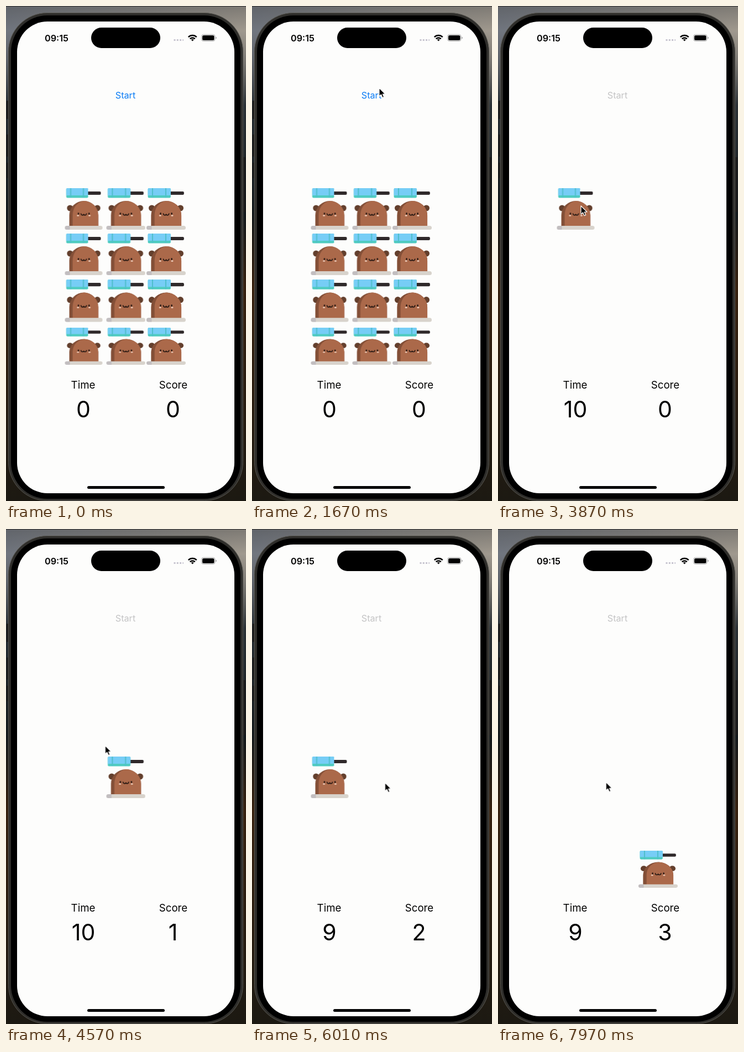
These frames come from a looping animation (434 by 894 pixels, 8000 ms). An HTML page:

```html
<!DOCTYPE html>
<html lang="en">
<head>
<meta charset="utf-8">
<title>Whack a mole</title>
<style>
  html, body { margin: 0; width: 100%; height: 100%; overflow: hidden; background: #15130f; }
  svg { display: block; }
  text { font-family: Inter, Roboto, sans-serif; text-anchor: middle; }
  .label { font-size: 18.7px; }
  .digits { font-size: 41px; }
</style>
</head>
<body>
<svg id="stage" width="434" height="894" viewBox="0 0 434 894">
  <defs>
    <linearGradient id="sky">
      <stop offset="0" stop-color="#70757e"/>
      <stop offset="1" stop-color="#a0998e"/>
    </linearGradient>
    <linearGradient id="dusk" x2="0" y2="1">
      <stop offset="0" stop-color="#4a4b4c" stop-opacity=".4"/>
      <stop offset=".05" stop-color="#4a4b4c" stop-opacity="0"/>
      <stop offset=".2" stop-color="#20272c" stop-opacity=".9"/>
      <stop offset=".42" stop-color="#151a1c"/>
      <stop offset=".57" stop-color="#38220f"/>
      <stop offset="1" stop-color="#1c1912"/>
    </linearGradient>
    <symbol id="mole" viewBox="0 0 68 75" preserveAspectRatio="none">
      <rect x="40" y="6" width="25" height="6" rx="2" fill="#2f292a"/>
      <rect x="2.5" width="39.5" height="17.5" rx="2" fill="#4fcbc0"/>
      <path d="M4.5 0H40a2 2 0 0 1 2 2V13H2.5V2a2 2 0 0 1 2-2Z" fill="#76cdf6"/>
      <path d="M10.5 0V17M33.5 0V17" stroke="#4fbfcb" stroke-width="2"/>
      <circle cx="9.3" cy="36" r="5.5" fill="#633f2d"/>
      <circle cx="58.7" cy="36" r="5.5" fill="#633f2d"/>
      <path d="M8 69V49a26.2 26 0 0 1 52.4 0V69Z" fill="#834f37"/>
      <path d="M14 69V49C14 35 23 24 35.5 23.1A26 26 0 0 1 60.4 49V69Z" fill="#ab694a"/>
      <ellipse cx="23.7" cy="49.5" rx="2" ry="1.5" fill="#e8c3b0"/>
      <ellipse cx="44.5" cy="49.5" rx="2" ry="1.5" fill="#e8c3b0"/>
      <ellipse cx="24.5" cy="46" rx="1.3" ry="2" fill="#2a1a14"/>
      <ellipse cx="43.7" cy="46" rx="1.3" ry="2" fill="#2a1a14"/>
      <path d="M29.2 46q.4 2.8 2.6 2.8 2.3 0 2.3-2.3 0 2.3 2.3 2.3 2.2 0 2.6-2.8" fill="none" stroke="#2a1a14" stroke-width="1.7" stroke-linecap="round"/>
      <rect y="68" width="68" height="7" rx="3.5" fill="#d8d3cc"/>
      <path d="M9 68H3.5a3.5 3.5 0 0 0 0 7H9Z" fill="#c2bec0"/>
    </symbol>
  </defs>

  <rect width="434" height="894" fill="url(#sky)"/>
  <rect width="434" height="894" fill="url(#dusk)"/>
  <rect width="434" height="1" fill="#2b2b2c"/>
  <g fill="#1c1b1a">
    <rect x="1" y="171" width="5" height="33" rx="1"/>
    <rect x="1" y="232" width="5" height="40" rx="1"/>
    <rect x="1" y="283" width="5" height="28" rx="1"/>
    <rect x="427" y="273" width="6" height="99" rx="1"/>
  </g>
  <rect x="4.5" y="12.5" width="424" height="881" rx="70" fill="#2f2e2b" stroke="#57554f"/>
  <rect x="9" y="17" width="415" height="873" rx="66"/>
  <rect x="20" y="28" width="393" height="852" rx="55" fill="#fdfdfc"/>

  <rect x="154" y="39" width="125" height="37" rx="18.5"/>
  <text x="91.5" y="63.5" font-size="16.2" font-weight="600">09:15</text>
  <path d="M303.500 61.500H321" stroke="#c6c4cf" stroke-width="3" stroke-dasharray="3 2.300"/>
  <g fill="none" stroke="#000" stroke-width="2.5">
    <path d="M329.800 56.200a10.500 10.500 0 0 1 14.900 0M332.700 59.300a6.500 6.500 0 0 1 9.100 0"/>
    <path d="M337.250 63.500l-2.400-2.500a3.400 3.400 0 0 1 4.800 0Z" fill="#000" stroke="none"/>
  </g>
  <rect x="353.5" y="51.5" width="24.5" height="12" rx="3.8" fill="none" stroke="#a5a5a5"/>
  <rect x="355" y="53" width="21.5" height="9" rx="2.5"/>
  <path d="M379.300 55.500q1.700.6 1.700 2t-1.700 2Z" fill="#a5a5a5"/>
  <rect x="147" y="867" width="140" height="5" rx="2.5"/>

  <text class="label" x="139.5" y="691">Time</text>
  <text class="label" x="302.5" y="691">Score</text>
  <g id="game"></g>
  <path id="cursor" d="M0 0V15.200L3.500 12 6 17.600 8.700 16.400 6.300 11H11Z" stroke="#fff" stroke-width="1.2" stroke-linejoin="round"/>
</svg>
<script>
const LOOP = 8000;
const START = 2270, HITS = [4170, 5780, 7400], TICK = 5310;
const game = document.getElementById('game');

function add(tag, attrs, content = '') {
  const el = document.createElementNS('http://www.w3.org/2000/svg', tag);
  for (const name in attrs) el.setAttribute(name, attrs[name]);
  el.textContent = content;
  return game.appendChild(el);
}

function loop(el, frames) {
  el.animate(frames, { duration: LOOP, iterations: Infinity });
}

// Visible only within the given [from, to] spans, listed in order.
function show(el, spans) {
  const steps = new Map([[0, 0]]);
  for (const [from, to] of spans) steps.set(from, 1).set(to, 0);
  steps.set(LOOP, 0);
  loop(el, [...steps].map(([time, opacity]) =>
    ({ offset: time / LOOP, opacity, easing: 'steps(1, end)' })));
}

// Each value is shown until the next one's time.
function sequence(values, draw) {
  values.forEach(([from, value], i) => {
    const to = i + 1 < values.length ? values[i + 1][0] : LOOP;
    show(draw(value), [[from, to]]);
  });
}

const columns = [[106.5, 68], [181.5, 70.5], [254, 71]];
const rows = [[329, 75], [411, 75], [494, 76.5], [581, 67]];
const targets = [0, 4, 3, 11];
const turns = [START, ...HITS, LOOP];

rows.forEach(([y, height], r) => columns.forEach(([x, width], c) => {
  const mole = add('use', { href: '#mole', x, y, width, height });
  const spans = [[0, START]];
  const turn = targets.indexOf(r * 3 + c);
  if (turn >= 0) spans.push([turns[turn], turns[turn + 1]]);
  show(mole, spans);
}));

const digits = x => value => add('text', { class: 'digits', x, y: 743 }, value);
sequence([[0, 0], [START, 10], [TICK, 9]], digits(140));
sequence([[0, 0], ...HITS.map((time, i) => [time, i + 1])], digits(302));
sequence([[0, '#0a7cf5'], [START, '#c4c4c5']], fill =>
  add('text', { x: 216, y: 167.3, 'font-size': 16.2, fill }, 'Start'));

const path = [
  [0, 450, 420], [1000, 450, 420], [1640, 230, 148], [1780, 230, 148],
  [2080, 220, 156], [3030, 220, 156], [3720, 150, 361], [4300, 150, 361],
  [5000, 244, 458], [5920, 244, 458], [6650, 128, 464], [7560, 128, 464],
  [7970, 195, 457], [8000, 202, 462]
];
loop(document.getElementById('cursor'), path.map(([time, x, y]) => ({
  offset: time / LOOP,
  transform: `translate(${x}px, ${y}px)`,
  easing: time < 7500 ? 'ease-in-out' : 'linear'
})));
</script>
</body>
</html>
```
